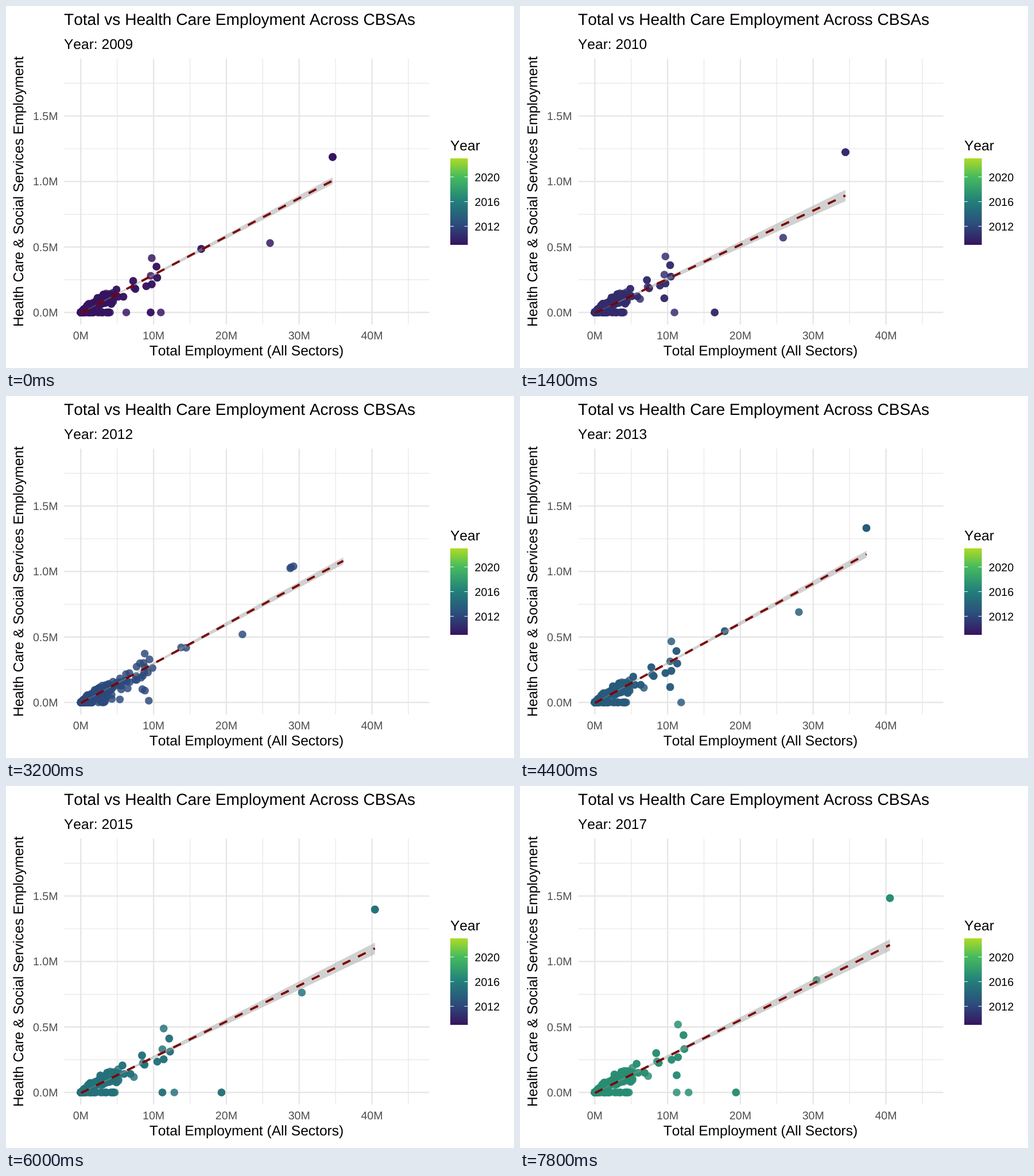
Write an HTML page with a canvas that moves like this. It is 885 px wide and 632 px high and loops after 8000 ms.

```html
<!DOCTYPE html>
<html lang="en">
<head>
<meta charset="utf-8">
<title>Total vs Health Care Employment</title>
<style>
html, body { margin: 0; width: 100%; height: 100%; overflow: hidden; background: #fff; }
canvas { display: block; }
</style>
</head>
<body>
<canvas id="chart" width="885" height="632"></canvas>
<script>
const ctx = document.getElementById('chart').getContext('2d');
const STEP_MS = 200, STEPS = 40, FIRST_YEAR = 2009, YEAR_SPAN = 14;

// Scales take millions of jobs.
const xOf = jobs => 130.3 + jobs * 12.68;
const yOf = health => 535 - health * 228.6;

const mix = (a, b, t) => a.map((v, i) => v + (b[i] - v) * t);

// Piecewise linear value of a list of [time, ...values].
function sample(keys, time) {
  let i = 0;
  while (i < keys.length - 2 && time >= keys[i + 1][0]) i++;
  const [t0, ...a] = keys[i], [t1, ...b] = keys[i + 1];
  return mix(a, b, Math.min(1, (time - t0) / (t1 - t0)));
}

// Every year begins on a whole step; between them time runs evenly.
const stepOfYear = i => Math.round(i * 69 / YEAR_SPAN);
function yearsAt(step) {
  let i = 0;
  while (stepOfYear(i + 1) <= step) i++;
  return i + (step - stepOfYear(i)) / (stepOfYear(i + 1) - stepOfYear(i));
}

const palette = [[0, 54, 20, 95], [3.2, 44, 74, 123], [7.25, 34, 130, 122], [11, 70, 187, 94], [14, 174, 219, 37]];
const colorOf = years => `rgb(${sample(palette, years).map(Math.round)})`;

const jobGrowth = [[0, 1], [1.5, 0.995], [4.3, 1.073], [6, 1.168], [8, 1.172]];

// Share of a value hidden (counted as zero) around the withheld years.
function hiddenShare(withheld, years) {
  return withheld.reduce((sum, year) => sum + Math.max(0, 1 - Math.abs(years - year)), 0);
}

const dots = [];
function addArea(jobs, health, { copies = 1, gain = 0.25, withheld = [] } = {}) {
  const position = years => [
    xOf(jobs * sample(jobGrowth, years)[0]),
    yOf(health * (1 + gain * (years / 8) ** 1.2) * (1 - hiddenShare(withheld, years)))
  ];
  for (let i = 0; i < copies; i++) dots.push(position);
}

const LARGEST_JOBS = 34.6;
const THIRD_WITHHELD = [1, 2, 6, 8];
addArea(LARGEST_JOBS, 1.187, { copies: 3 });
addArea(26, 0.53, { gain: 0.62 });
addArea(16.55, 0.485, { copies: 2, withheld: THIRD_WITHHELD });
addArea(9.75, 0.415);
addArea(10.4, 0.35, { copies: 2 });
addArea(10.5, 0.265, { copies: 2 });
addArea(9.6, 0.28, { withheld: [8] });
addArea(9.75, 0.215, { copies: 2 });
addArea(9, 0.2, { copies: 2 });
addArea(7.2, 0.24, { copies: 2 });
addArea(7.3, 0.19);
addArea(7.5, 0.18, { copies: 2 });
addArea(5.85, 0.12, { copies: 2 });
addArea(4.9, 0.175, { copies: 2 });
addArea(5.1, 0.12, { copies: 2 });
addArea(4.2, 0.065, { copies: 2 });
addArea(2.3, 0.11, { copies: 2 });
addArea(4.4, 0.15);
addArea(3.7, 0.13);
addArea(11, 0);
addArea(9.6, 0.105, { copies: 2, withheld: [0, 6] });
addArea(6.25, 0.1, { withheld: [0] });
addArea(3.8, 0, { copies: 2 });

// Dense crowd of small areas near zero
let seed = 7;
const random = () => (seed = seed * 16807 % 2147483647) / 2147483647;
for (let i = 0; i < 240; i++) {
  const jobs = 4.5 * random() ** 3;
  const health = jobs * (0.017 + 0.021 * random()) + 0.028 * random() * Math.min(1, jobs);
  addArea(jobs, i % 5 ? health : 0, { gain: 0.15 });
}

// During 2012 the rows pair up with other rows, so the dots cross over.
function dotPosition(i, years) {
  if (years <= 3 || years >= 4) return dots[i](years);
  const partner = (i + 140) % dots.length;
  return mix(dots[i](3), dots[partner](4), years - 3);
}

function text(str, x, y, size, color = '#000', align = 'left') {
  ctx.font = `${size}px "Liberation Sans", Arial, sans-serif`;
  ctx.fontKerning = 'none';
  ctx.textRendering = 'geometricPrecision';
  ctx.textAlign = align;
  ctx.fillStyle = color;
  ctx.fillText(str, x, y);
}

function line(x1, y1, x2, y2, width, color) {
  ctx.strokeStyle = color;
  ctx.lineWidth = width;
  ctx.beginPath();
  ctx.moveTo(x1, y1);
  ctx.lineTo(x2, y2);
  ctx.stroke();
}

function drawGrid() {
  const vertical = (jobs, width) => line(xOf(jobs), 92, xOf(jobs), 556, width, '#e6e6e6');
  const horizontal = (health, width) => line(101.5, yOf(health), 737.5, yOf(health), width, '#e6e6e6');
  for (let jobs = 5; jobs < 50; jobs += 10) vertical(jobs, 1.2);
  for (let health = 0.25; health < 2; health += 0.5) horizontal(health, 1.2);
  for (let jobs = 0; jobs < 50; jobs += 10) {
    vertical(jobs, 2.4);
    text(jobs + 'M', xOf(jobs), 581.5, 19.6, '#4d4d4d', 'center');
  }
  for (let health = 0; health < 2; health += 0.5) {
    horizontal(health, 2.4);
    text(health.toFixed(1) + 'M', 90.5, yOf(health) + 7, 19.6, '#4d4d4d', 'right');
  }
}

function drawLabels(year) {
  text('Total vs Health Care Employment Across CBSAs', 101, 32.5, 28.1);
  text('Year: ' + year, 101, 75, 24.55);
  text('Total Employment (All Sectors)', 419, 610, 24.55, '#000', 'center');
  ctx.save();
  ctx.translate(30, 324);
  ctx.rotate(-Math.PI / 2);
  text('Health Care & Social Services Employment', 0, 0, 24.55, '#000', 'center');
  ctx.restore();
}

function drawLegend() {
  const top = 266, bottom = 417, left = 774, right = 804.5;
  text('Year', left, 252, 24.55);
  const bar = ctx.createLinearGradient(0, bottom, 0, top);
  for (const [years] of palette) bar.addColorStop(years / YEAR_SPAN, colorOf(years));
  ctx.fillStyle = bar;
  ctx.fillRect(left, top, right - left, bottom - top);
  for (const year of [2012, 2016, 2020]) {
    const y = bottom - (year - FIRST_YEAR) / YEAR_SPAN * (bottom - top);
    line(left, y, left + 6, y, 1, '#fff');
    line(right - 6, y, right, y, 1, '#fff');
    text(year, 816.5, y + 7.3, 19.6);
  }
}

function drawDots(years) {
  ctx.fillStyle = colorOf(years);
  ctx.globalAlpha = 0.84;
  for (let i = dots.length - 1; i >= 0; i--) {
    const [x, y] = dotPosition(i, years);
    ctx.beginPath();
    ctx.arc(x, y, 6.8, 0, 2 * Math.PI);
    ctx.fill();
  }
  ctx.globalAlpha = 1;
}

// The fit flattens and its band widens while the third largest area is hidden.
function drawTrend(years) {
  const hidden = hiddenShare(THIRD_WITHHELD, years);
  const slope = 0.527 + 0.005 * years - 0.064 * hidden;
  const half = 6 + 4 * hidden;
  const startX = 130.5, startY = 536, waistX = 150;
  const x = xOf(LARGEST_JOBS * sample(jobGrowth, years)[0]);
  const fit = px => startY - slope * (px - startX);
  ctx.fillStyle = 'rgba(153, 153, 153, 0.45)';
  ctx.beginPath();
  ctx.moveTo(startX, startY - 1);
  ctx.lineTo(waistX, fit(waistX) - 0.7);
  ctx.lineTo(x, fit(x) - half);
  ctx.lineTo(x, fit(x) + half);
  ctx.lineTo(waistX, fit(waistX) + 0.7);
  ctx.lineTo(startX, startY + 1);
  ctx.fill();
  ctx.setLineDash([14.95, 14.95]);
  line(startX, startY, x, fit(x), 3.74, '#7c0000');
  ctx.setLineDash([]);
}

function draw() {
  const step = Math.floor(performance.now() / STEP_MS) % STEPS;
  const years = yearsAt(step);
  ctx.fillStyle = '#fff';
  ctx.fillRect(0, 0, 885, 632);
  drawGrid();
  drawLabels(FIRST_YEAR + Math.floor(years));
  drawLegend();
  drawDots(years);
  drawTrend(years);
  requestAnimationFrame(draw);
}
draw();
</script>
</body>
</html>
```
